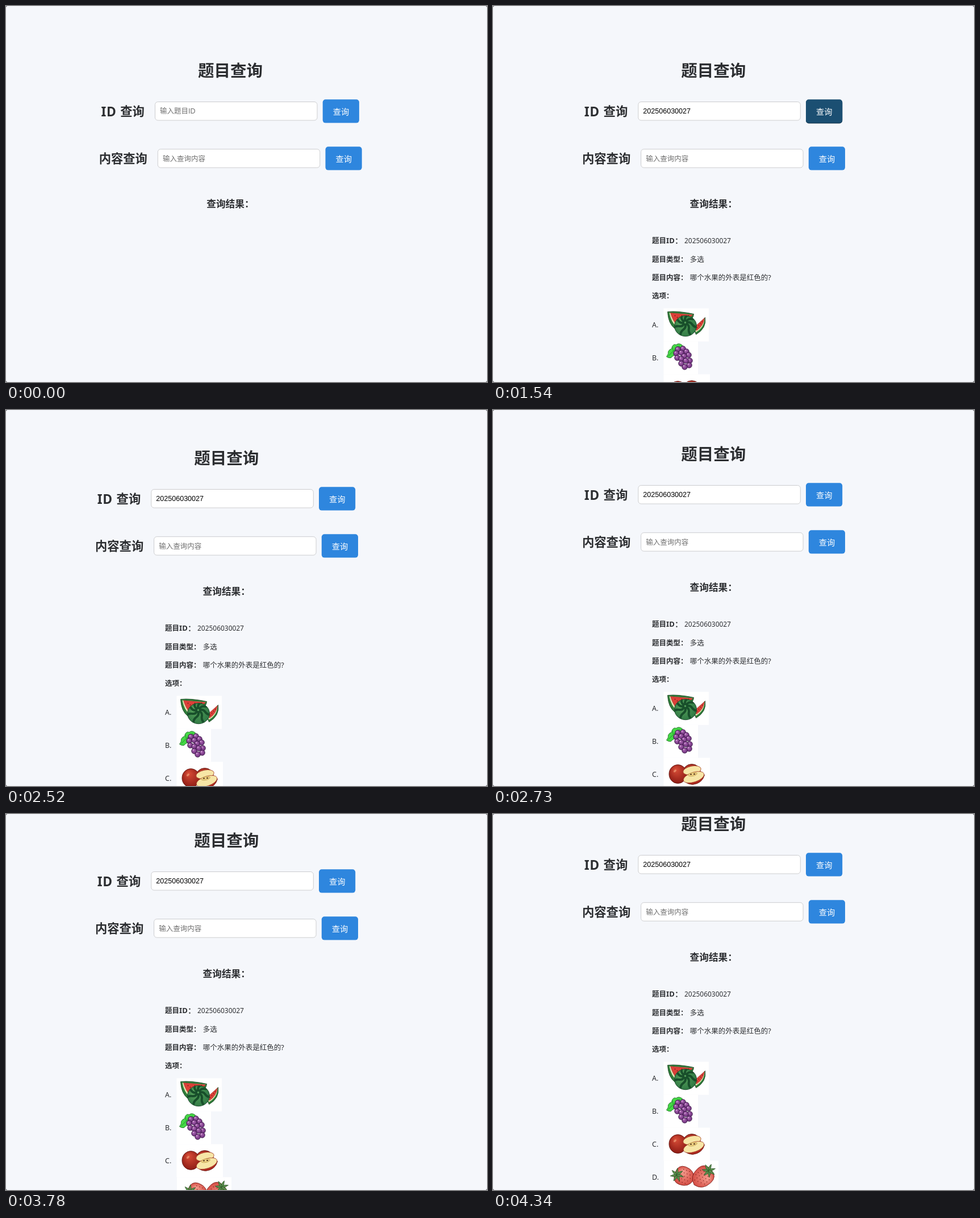
These frames come from a looping animation (847x661 px, 4830 ms). An HTML page with a canvas:

```html
<!DOCTYPE html>
<html lang="zh-CN">
<head>
<meta charset="utf-8">
<title>题目查询</title>
<style>
html, body { margin: 0; width: 100%; height: 100%; overflow: hidden; background: #f5f7fb; }
canvas { display: block; }
</style>
</head>
<body>
<canvas id="stage" width="847" height="661"></canvas>
<script>
const ctx = document.getElementById('stage').getContext('2d');
const W = 847, H = 661, LOOP = 4830, STEP = 70;
const UI = '"Noto Sans", "Noto Sans CJK SC", sans-serif';
const FIELD = '"Liberation Sans", "Noto Sans CJK SC", sans-serif';
const INK = '#2c2e31', BLUE = [46, 134, 222], NAVY = [27, 79, 114];
const ID = '202506030027';

const FOCUS_AT = 840, PASTE_AT = 1120, RESULT_AT = 1470;
const hoverKeys = [[1190, 0], [1540, 1], [2030, 1], [2310, 0]];
const scrollKeys = [
  [2310, 0], [2380, 6], [2450, 20], [2520, 29], [2590, 34], [2660, 34],
  [2730, 36], [2800, 44], [2870, 54], [2940, 61], [3010, 65], [3710, 65],
  [3780, 67], [3920, 69], [3990, 69],
  [4060, 72], [4130, 81], [4200, 89], [4270, 94], [4340, 96]
];

function track(keys, t) {
  if (t <= keys[0][0]) return keys[0][1];
  for (let i = 1; i < keys.length; i++) {
    const [t0, a] = keys[i - 1], [t1, b] = keys[i];
    if (t <= t1) return a + (b - a) * (t - t0) / (t1 - t0);
  }
  return keys[keys.length - 1][1];
}

// y is the middle of the line
function text(str, x, y, size, { weight = 400, color = INK, font = UI, gap = 0 } = {}) {
  ctx.font = `${weight} ${size}px ${font}`;
  ctx.letterSpacing = gap + 'px';
  ctx.fillStyle = color;
  ctx.fillText(str, x, y + size * 0.375);
  ctx.letterSpacing = '0px';
}

function box(x, y, w, h, r, fill) {
  ctx.beginPath();
  ctx.roundRect(x, y, w, h, r);
  ctx.fillStyle = fill;
  ctx.fill();
}

function oval(x, y, rx, ry, fill, line, turn = 0) {
  ctx.beginPath();
  ctx.ellipse(x, y, rx, ry, turn, 0, Math.PI * 2);
  ctx.fillStyle = fill;
  ctx.fill();
  if (line) {
    ctx.strokeStyle = line;
    ctx.lineWidth = 0.8;
    ctx.stroke();
  }
}

function curve(d, color, width) {
  ctx.strokeStyle = color;
  ctx.lineWidth = width;
  ctx.stroke(new Path2D(d));
}

function shape(d, fill, line, width = 0.8) {
  ctx.fillStyle = fill;
  ctx.fill(new Path2D(d));
  if (line) curve(d, line, width);
}

function shade(x, y, r, inner, outer) {
  const g = ctx.createRadialGradient(x - r * 0.3, y - r * 0.4, r * 0.1, x, y, r * 1.1);
  g.addColorStop(0, inner);
  g.addColorStop(1, outer);
  return g;
}

function field(x, y, focused) {
  box(x, y, 286.5, 33.5, 5.5, '#fff');
  const inset = focused ? 1 : 0.5;
  ctx.beginPath();
  ctx.roundRect(x + inset, y + inset, 286.5 - 2 * inset, 33.5 - 2 * inset, 5);
  ctx.strokeStyle = focused ? '#1b5c94' : '#cbcccf';
  ctx.lineWidth = focused ? 2 : 1;
  ctx.stroke();
}

function button(x, y, hover) {
  if (hover) box(x, y + 0.8, 64.2, 41.3, 5, `rgba(12,42,64,${hover})`);
  const mix = BLUE.map((c, i) => Math.round(c + (NAVY[i] - c) * hover));
  box(x, y, 64.2, 41.3, 5, `rgb(${mix})`);
  text('查询', x + 18, y + 20.9, 14.2, { weight: 500, color: '#fff' });
}

function melon() {
  shape('M7 6 Q25 4 53 10 Q53 18 40 26 L20 36 Q8 27 7 6Z', '#2f7d3a', '#173f20');
  shape('M10 8 L51 11 L40 22 L23 33 Q13 24 10 8Z', '#e6e6b4');
  shape('M12 8 L51 11.5 Q46 18 24 30 Q16 22 12 8Z', '#dc4038', '#8d211c', 0.5);
  shape('M73 16 Q76 35 57 46 L53 36Z', '#2f7d3a', '#173f20');
  shape('M72 17 Q72 33 57 42 L53 35Z', '#e6e6b4');
  shape('M72 17 Q70 31 58 39 L53 34Z', '#dc4038', '#8d211c', 0.5);
  for (let i = 0; i < 7; i++) oval(20 + i * 4, 13 + (i % 3) * 3, 0.6, 0.9, '#4a1512');
  for (let i = 0; i < 4; i++) oval(59 + i * 3, 34 - i * 3.5, 0.6, 0.8, '#4a1512');
  oval(38.5, 31, 19.5, 18.2, shade(38, 31, 20, '#5aa45c', '#2b7442'), '#123c20');
  ctx.save();
  ctx.beginPath();
  ctx.ellipse(38.5, 31, 19, 17.8, 0, 0, Math.PI * 2);
  ctx.clip();
  for (let i = 0; i < 8; i++) {
    ctx.save();
    ctx.translate(38, 25);
    ctx.rotate(i * Math.PI / 4 + 0.2);
    curve('M2 0 Q8 -4 13 1 T28 3', '#184f2b', 4);
    ctx.restore();
  }
  ctx.restore();
}

function grapes() {
  const spots = [
    [25, 14], [34, 13], [22, 21], [40, 18], [31, 20], [44, 24], [24, 29], [36, 26],
    [31, 31], [46, 34], [39, 34], [31, 39], [45, 42], [37, 45]
  ];
  shape('M15 9 Q18 4 22 6 Q27 2 33 7 Q31 13 28 18 Q25 22 22 25 Q18 23 13 29 Q9 30 5 27 Q9 22 8 18 Q10 14 14 13Z', '#45d846', '#15601d');
  curve('M29 8 L17 17 L8 26 M17 17 L15 10 M20 15 L21 22', '#218b29', 0.9);
  for (const [x, y] of spots) {
    oval(x, y, 4.8, 4.8, shade(x, y, 4.8, '#b06ab6', '#672a77'), '#32133d');
    oval(x - 1.5, y - 1.8, 1.1, 0.8, '#e0c3e4');
  }
}

function apples() {
  oval(49.5, 25.5, 15.5, 14.5, shade(49, 25, 16, '#c94331', '#8c1f17'), '#5c120e');
  oval(25, 28.5, 15.5, 16.5, shade(26, 27, 17, '#d44a35', '#8d1b14'), '#5c120e');
  oval(20, 23, 3, 1.8, 'rgba(244,170,130,.6)', null, -0.7);
  shape('M35 36 Q37 46 51 47 Q68 45 72 30 L68 27Z', '#b02a1f', '#5c120e');
  oval(50, 22, 16, 7.5, '#f7e6a6', '#a33a25', -0.2);
  oval(53, 34, 19, 8.5, '#f7e6a6', '#a33a25', -0.32);
  oval(51, 29, 8, 3, '#ecd183', '#bd9848', -0.2);
  oval(48, 29, 1.7, 1, '#4a2714');
  oval(54, 28.5, 1.7, 1, '#4a2714');
}

function berry(x, y, rx, ry, turn) {
  ctx.save();
  ctx.translate(x, y);
  ctx.rotate(turn);
  shape(`M${-rx} 0 Q${-rx} ${-ry} ${-rx * 0.2} ${-ry} Q${rx * 0.8} ${-ry} ${rx} 0 Q${rx * 0.8} ${ry} ${-rx * 0.2} ${ry} Q${-rx} ${ry} ${-rx} 0Z`,
    shade(0, 0, rx, '#f3988a', '#d0433b'), '#7d211c');
  for (let r = -2; r <= 2; r++) {
    for (let c = -2; c <= 2; c++) {
      const px = c * 5.5 + (r % 2) * 2.5, py = r * 5.6;
      if ((px / rx) ** 2 + (py / ry) ** 2 < 0.68) oval(px, py, 0.9, 0.6, '#7a1f1a');
    }
  }
  ctx.restore();
}

function leaves(x, y, turn) {
  ctx.save();
  ctx.translate(x, y);
  ctx.rotate(turn);
  for (let i = 0; i < 7; i++) {
    ctx.rotate(Math.PI * 2 / 7);
    shape('M0 -1.5 Q6 -3.5 12 0 Q6 2.5 0 1.5Z', '#5a8f4c', '#234b20', 0.6);
  }
  ctx.restore();
}

function berries() {
  berry(36, 27.5, 17.5, 16.5, 0.35);
  leaves(23, 25, 0.3);
  berry(68, 29, 20, 17, 2.4);
  leaves(79, 17.5, 0.6);
}

const options = [
  ['A.', 79.5, melon], ['B.', 60.5, grapes], ['C.', 81.5, apples], ['D.', 96, berries]
];

function results() {
  const bold = { weight: 700 }, body = { weight: 500 };
  text('题目', 280, 412.5, 12.5, bold);
  text('ID：', 305, 412.5, 13, { weight: 800, gap: 0.3 });
  text(ID, 337, 412.5, 11.95, body);
  text('题目类型：', 280, 445, 12.5, bold);
  text('多选', 346.7, 445, 12.5);
  text('题目内容：', 280, 477.5, 12.5, bold);
  text('哪个水果的外表是红色的?', 346.7, 477.5, 12.5);
  text('选项：', 280, 509.5, 12.5, bold);
  options.forEach(([label, w, fruit], i) => {
    const y = 531.5 + i * 58;
    text(label, 280, y + 28.7, 12.5, body);
    ctx.save();
    ctx.translate(i === 3 ? 301 : 300.5, y);
    ctx.fillStyle = '#fff';
    ctx.fillRect(0, 0, w, 58.2);
    fruit();
    ctx.restore();
  });
}

function form(t, hover) {
  const focused = t >= FOCUS_AT && t < RESULT_AT;
  const filled = t >= PASTE_AT;
  const hint = { color: '#707070', font: FIELD };
  const bold = { weight: 700 };

  text('题目查询', 338, 113.5, 28.5, bold);
  text('ID', 167.5, 185.2, 22.8, { weight: 900, gap: 0.6 });
  text('查询', 201.3, 185.5, 21.3, bold);
  field(262, 168, focused);
  if (filled) text(ID, 271, 184.7, 12.55, { color: '#000', font: FIELD });
  else text('输入题目ID', 271, 184.7, 12.5, hint);
  if (focused) {
    ctx.fillStyle = '#111';
    ctx.fillRect(filled ? 355 : 271, 178, 1, 14);
  }
  button(557.7, 164.3, hover);

  text('内容查询', 163.7, 268.5, 21.3, bold);
  field(266.8, 251.2, false);
  text('输入查询内容', 276, 268, 12.5, hint);
  button(562.5, 247.3, 0);
  text('查询结果：', 353.3, 347.5, 16.66, bold);
}

function corners() {
  ctx.beginPath();
  ctx.rect(0, 0, W, H);
  ctx.roundRect(0, 0, W, H, 3);
  ctx.fillStyle = '#4a4c50';
  ctx.fill('evenodd');
}

function draw(now) {
  const t = Math.floor((now % LOOP) / STEP) * STEP;
  const shown = t >= RESULT_AT;
  ctx.fillStyle = '#f5f7fb';
  ctx.fillRect(0, 0, W, H);
  ctx.save();
  ctx.translate(0, -Math.round(track(scrollKeys, t)));
  ctx.save();
  ctx.translate(shown ? -6.7 : 0, 0);
  form(t, track(hoverKeys, t));
  ctx.restore();
  if (shown) results();
  ctx.restore();
  corners();
}

let start;
function tick(now) {
  start ??= now;
  draw(now - start);
  requestAnimationFrame(tick);
}
draw(0);
requestAnimationFrame(tick);
</script>
</body>
</html>
```
